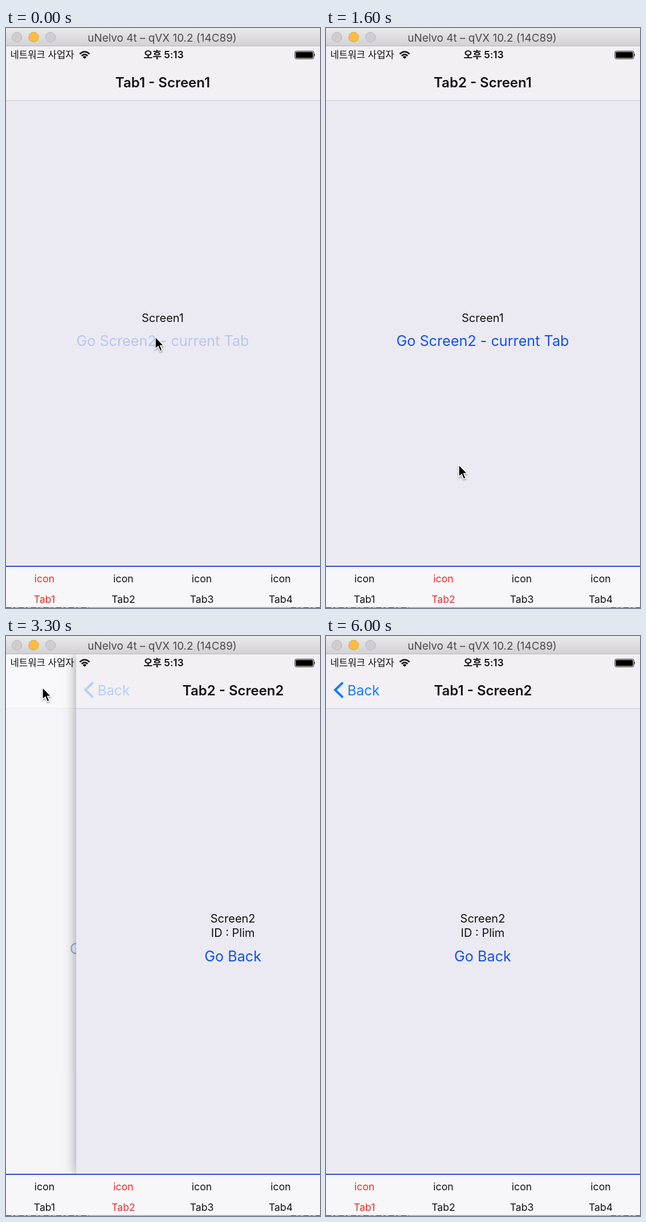
Write an HTML page that moves like this. It is 551x1016 px and loops after 6.1 s.

```html
<!DOCTYPE html>
<html lang="ko">
<head>
<meta charset="utf-8">
<title>Tab navigation</title>
<style>
  html, body { margin: 0; width: 100%; height: 100%; overflow: hidden; background: #fff; }
  svg { display: block; width: 551px; height: 1016px; }
  text { font-family: Inter, "Noto Sans CJK KR", "Noto Sans CJK", sans-serif; fill: #111; }
  .mid { text-anchor: middle; }
  .title { font-size: 24px; font-weight: 600; }
  .body { font-size: 20px; }
  .link { font-size: 25.2px; fill: #1450e6; }
  .tab text { font-size: 17.6px; fill: inherit; }
  .shadow { filter: blur(10.5px); fill-opacity: .4; }
  #cursor { filter: drop-shadow(0 2px 1.5px rgba(0, 0, 0, .35)); }
</style>
</head>
<body>
<svg viewBox="0 0 551 1016">
  <defs>
    <linearGradient id="chrome" x2="0" y2="1">
      <stop stop-color="#ebe9eb"/>
      <stop offset="1" stop-color="#d2d0d3"/>
    </linearGradient>
    <clipPath id="view"><path d="M0 32h551v910H0z"/></clipPath>
    <g id="page">
      <path d="M0 32h551v910H0z" fill="#ebeaf3"/>
      <path d="M0 32h551v95H0z" fill="#f2f0f5"/>
      <path d="M0 127h551" stroke="#d6d4da" stroke-width="1.4"/>
    </g>
  </defs>

  <path d="M0 0h551v1016H0z" fill="#fff"/>
  <g clip-path="url(#view)">
    <g id="first">
      <use href="#page"/>
      <text class="mid title" x="275" y="104"></text>
      <text class="mid body" x="275" y="514.5">Screen1</text>
      <text id="go" class="mid link" x="275" y="557">Go Screen2 - current Tab</text>
    </g>
    <g id="second">
      <path class="shadow" d="M0 32h551v910H0z"/>
      <use href="#page"/>
      <g id="back">
        <path d="M29.5 81.5L16 94.5L29.5 107.5" fill="none" stroke="#147cf5" stroke-width="4"/>
        <text x="37.5" y="104" style="font-size:24.2px;fill:#147cf5">Back</text>
      </g>
      <text class="mid title" x="275.5" y="104"></text>
      <text class="mid body" x="275" y="502">Screen2</text>
      <text class="mid body" x="275" y="527">ID : Plim</text>
      <text class="mid link" x="275" y="569.5">Go Back</text>
    </g>
  </g>

  <!-- status bar -->
  <text x="7.5" y="53" font-size="16.7">네트워크 사업자</text>
  <g fill="none" stroke="#111" stroke-width="2.5">
    <path d="M129.5 45.5Q138 37.5 146.5 45.5M132.7 48.8Q138 44 143.3 48.8"/>
  </g>
  <path d="M134.7 50.7Q138 48 141.3 50.7L138 54z"/>
  <text class="mid" x="276.5" y="53" font-size="17.2" font-weight="600">오후 5:13</text>
  <rect x="507" y="40.5" width="33" height="13.5" rx="2.5" fill="none" stroke="#111"/>
  <rect x="508.5" y="42" width="30" height="10.5" rx="1.5"/>
  <path d="M541 45q2.4 2.2 0 4.5z"/>

  <!-- window chrome -->
  <path d="M0 0h551v32H0z" fill="url(#chrome)"/>
  <path d="M0 31.5h551" stroke="#b9b7ba"/>
  <g fill="#cfcdd0" stroke="#b9b7ba">
    <circle cx="19" cy="16" r="8.6"/>
    <circle cx="48.5" cy="16" r="8.6" fill="#fdbd3e" stroke="#e0a030"/>
    <circle cx="78" cy="16" r="8.6"/>
  </g>
  <text class="mid" x="274" y="23.5" font-size="18.9" style="fill:#4a484b">uNelvo 4t – qVX 10.2 (14C89)</text>

  <!-- tab bar -->
  <path d="M0 942h551v74H0z" fill="#f7f6f8"/>
  <path d="M0 943h551" stroke="#2a4bd7" stroke-width="2"/>
  <g id="tabs"></g>
  <path d="M0 1015.2h551" stroke="#aaa8aa" stroke-width="1.6"/>
  <path d="M0 1015.5h146M500 1015.5h51" stroke="#444" stroke-dasharray="9 4 3 6"/>

  <path id="cursor" d="M0 0V21L5 16.7L8.5 25L12.2 23.4L8.7 15.4H15Z" stroke="#fff" stroke-width="1.5"/>
</svg>
<script>
const LOOP = 6100, STEP = 100, WIDTH = 551, SLIDE = 500;
const $ = id => document.getElementById(id);
const clamp = v => Math.min(1, Math.max(0, v));
const between = (t, a, b) => t >= a && t < b;

$('tabs').innerHTML = [67.5, 206, 343.5, 482].map((x, i) =>
  `<g class="tab"><text class="mid" x="${x}" y="971">icon</text>` +
  `<text class="mid" x="${x}" y="1006.5">Tab${i + 1}</text></g>`).join('');
const tabs = document.querySelectorAll('.tab');
const titles = document.querySelectorAll('.title');

// time, x, y of the pointer tip
const path = [
  [0, 262, 541], [500, 262, 541], [1000, 210, 972], [1300, 212, 974],
  [1900, 254, 556], [2500, 254, 556], [3100, 64, 90], [3300, 64, 90],
  [3700, 67, 89], [3900, 67, 89], [4500, 73, 968], [4800, 73, 968],
  [5300, 30, 1030], [LOOP, 30, 1030]
];

// cubic-bezier(.25, .1, .25, 1)
function ease(x) {
  x = clamp(x);
  const curve = (s, a, b) => 3 * a * s * (1 - s) ** 2 + 3 * b * s * s * (1 - s) + s ** 3;
  let lo = 0, hi = 1;
  for (let i = 0; i < 24; i++) {
    const mid = (lo + hi) / 2;
    if (curve(mid, .25, .25) < x) lo = mid; else hi = mid;
  }
  return curve(lo, .1, 1);
}
const slide = (t, start) => ease((t - start) / SLIDE);

function pointer(t) {
  const i = path.findIndex(p => p[0] > t);
  const [t0, x0, y0] = path[i - 1], [t1, x1, y1] = path[i];
  const u = (t - t0) / (t1 - t0), k = u * u * (3 - 2 * u);
  return [x0 + (x1 - x0) * k, y0 + (y1 - y0) * k];
}

function draw(t) {
  const tab = between(t, 1200, 4700) ? 2 : 1;
  const pushed = t < 1200 ? slide(t, 6) : tab === 1 ? 1 : slide(t, 2106) - slide(t, 3216);
  const pressed = t < 250 || between(t, 1950, 2350);

  titles.forEach((el, i) => el.textContent = `Tab${tab} - Screen${i + 1}`);
  tabs.forEach((el, i) => el.style.fill = i + 1 === tab ? '#e0302a' : '#111');
  $('first').setAttribute('transform', `translate(${-14.7 * pushed})`);
  $('first').setAttribute('opacity', 1 - .7 * pushed);
  $('second').setAttribute('transform', `translate(${WIDTH * (1 - pushed)})`);
  $('second').setAttribute('visibility', pushed > 0 ? 'visible' : 'hidden');
  $('go').setAttribute('opacity', pressed ? .23 : 1);
  $('back').setAttribute('opacity', between(t, 3200, 3800) ? .27 : 1);
  $('cursor').setAttribute('transform', `translate(${pointer(t)})`);
}

const begin = performance.now();
function frame() {
  const t = (performance.now() - begin) % LOOP;
  draw(Math.floor(t / STEP) * STEP);
  requestAnimationFrame(frame);
}
frame();
</script>
</body>
</html>
```
